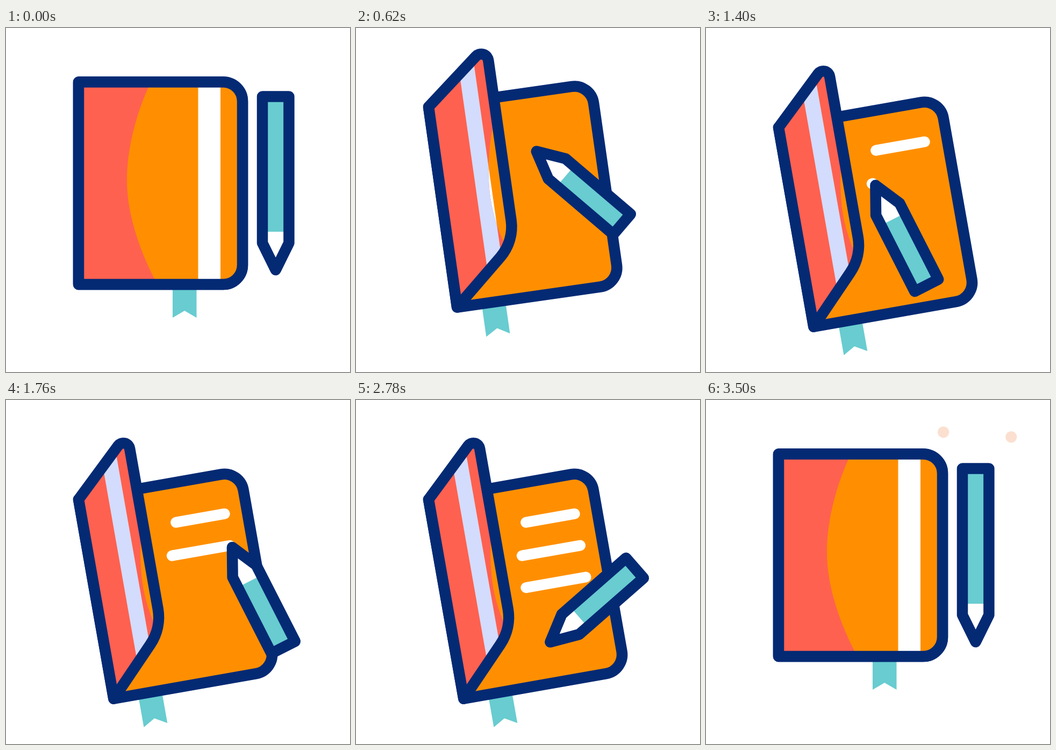
Write an HTML page with a canvas that moves like this. It is 640x640 px and loops after 3.6 s.

```html
<!DOCTYPE html>
<html lang="en">
<head>
<meta charset="utf-8">
<title>Notebook and pencil</title>
<style>
  html, body { margin: 0; width: 100%; height: 100%; overflow: hidden; background: #fff; }
  canvas { display: block; width: 640px; height: 640px; }
</style>
</head>
<body>
<canvas id="stage" width="640" height="640"></canvas>
<script>
const ctx = document.getElementById('stage').getContext('2d');
const LOOP = 3600;
const NAVY = '#042a74', ORANGE = '#ff8f00', CORAL = '#ff6150';
const TEAL = '#68ccd0', LAVENDER = '#d3dcfc', DOT = '242,152,98';
const W = 305, H = 376.5, R = 36, STROKE = 20.5;
const SPINE = { x: 135, y: 100.5 }, TILT = 10, DROP = 84.5;

const rad = deg => deg * Math.PI / 180;
const mix = (a, b, k) => a + (b - a) * k;
const blend = (p, q, k) => ({ x: mix(p.x, q.x, k), y: mix(p.y, q.y, k) });
const ramp = (t, from, to) => Math.min(1, Math.max(0, (t - from) / (to - from)));
const move = (t, from, to) => (1 - Math.cos(Math.PI * ramp(t, from, to))) / 2;
// Rises to 1 during a..b, falls back to 0 during c..d
const swell = (t, a, b, c, d) => move(t, a, b) - move(t, c, d);

// Handwritten rows in page coordinates
const rows = [171, 153, 150].map((x, i) => ({
  from: { x, y: 73.5 + 59.8 * i },
  to: { x: 263, y: 73.5 + 59.8 * i },
  start: 725 + 640 * i,
  end: 1145 + 640 * i
}));

function poly(points) {
  ctx.beginPath();
  points.forEach(([x, y]) => ctx.lineTo(x, y));
  ctx.closePath();
}

function fill(color) {
  ctx.fillStyle = color;
  ctx.fill();
}

function outline() {
  ctx.strokeStyle = NAVY;
  ctx.lineWidth = STROKE;
  ctx.stroke();
}

// Board hinged at x = 0; opening narrows it and lifts its free side
function board(open) {
  const edge = W * (1 - 0.639 * open);
  const top = -105 * open, bottom = H - 114 * open;
  ctx.beginPath();
  ctx.moveTo(0, 0);
  ctx.arcTo(edge, top, edge, bottom, mix(R, 12, open));
  ctx.arcTo(edge, bottom, 0, H, mix(R, 90, open));
  ctx.lineTo(0, H);
  ctx.closePath();
  return edge;
}

function shade() {
  ctx.beginPath();
  ctx.moveTo(-40, -200);
  ctx.lineTo(224, -200);
  ctx.lineTo(130, 9.5);
  ctx.bezierCurveTo(104, 68, 90, 130, 90, 183);
  ctx.bezierCurveTo(90, 240, 110, 305, 141, 366);
  ctx.lineTo(200, 480);
  ctx.lineTo(-40, 480);
  ctx.closePath();
}

function drawCover(open) {
  ctx.save();
  const edge = board(open), scale = edge / W;
  const left = edge - 39.4 - 43.1 * scale;
  const right = edge - 18.5 - 22.5 * scale;
  const paint = (color, from, to) => {
    ctx.fillStyle = color;
    ctx.fillRect(from, -200, to - from, 700);
  };
  ctx.clip();
  paint(ORANGE, -20, 380);
  paint('#fff', left, right);
  shade();
  ctx.clip();
  paint(CORAL, -20, 380);
  paint(LAVENDER, left, right);
  ctx.restore();

  board(open);
  outline();
}

function drawRows(t) {
  ctx.strokeStyle = '#fff';
  ctx.lineWidth = 20;
  for (const { from, to, start, end } of rows) {
    if (t <= start) continue;
    const tip = blend(from, to, move(t, start, end));
    ctx.beginPath();
    ctx.moveTo(from.x, from.y);
    ctx.lineTo(tip.x, tip.y);
    ctx.stroke();
  }
}

function drawRibbon(x) {
  poly([[x, H], [x + 44.5, H], [x + 44.5, 438.5], [x + 22.2, 425.5], [x, 438.5]]);
  fill(TEAL);
}

function drawBook(t) {
  ctx.save();
  ctx.translate(SPINE.x, SPINE.y + DROP * swell(t, 405, 812, 2790, 3210));
  ctx.rotate(-rad(TILT) * swell(t, 200, 790, 2790, 3420));
  drawRibbon(175 - 129 * swell(t, 200, 430, 3265, 3500));
  board(0);
  fill(ORANGE);
  drawRows(t);
  board(0);
  outline();
  drawCover(swell(t, 200, 702, 2880, 3430));
  ctx.restore();
}

// Stage position of the writing tip on the settled page
function writingTip(t) {
  let p = rows[0].from, last = 0;
  for (const { from, to, start, end } of rows) {
    p = blend(p, from, move(t, last, start));
    p = blend(p, to, move(t, start, end));
    last = end;
  }
  const x = p.x + 4, y = p.y + 4, a = rad(TILT);
  return {
    x: SPINE.x + x * Math.cos(a) + y * Math.sin(a),
    y: SPINE.y + DROP - x * Math.sin(a) + y * Math.cos(a)
  };
}

function pencilPose(t) {
  const rest = { x: 501.7, y: 288.75 }, sweep = { x: 440, y: 381.5 };
  const reach = move(t, 200, 762);
  const away = move(t, 2440, 2780), home = move(t, 2780, 3400);
  const half = mix(161.25, 104.5, swell(t, 200, 600, 2780, 3400));

  let angle = 153 * reach;
  const tip = writingTip(t);
  const aim = { x: tip.x + half * Math.sin(rad(angle)), y: tip.y - half * Math.cos(rad(angle)) };
  angle = mix(mix(angle, 48.8, away), 0, home);

  // Returns above its place, then drops into it
  const hover = { x: rest.x, y: rest.y - 84 * (1 - ramp(t, 3400, 3500) ** 2) };
  const center = blend(blend(blend(rest, aim, reach), sweep, away), hover, home);
  return { ...center, angle, half };
}

function drawPencil(t) {
  const { x, y, angle, half } = pencilPose(t);
  const side = 24.7, shoulder = half - 50;
  ctx.save();
  ctx.translate(x, y);
  ctx.rotate(rad(angle));
  const body = () => poly([[-side, -half], [side, -half], [side, shoulder], [0, half], [-side, shoulder]]);
  body();
  fill('#fff');
  ctx.fillStyle = TEAL;
  ctx.fillRect(-side, -half, side * 2, half * 2 - 71);
  body();
  outline();
  ctx.restore();
}

function drawDots(t) {
  const alpha = move(t, 3260, 3340) - 0.7 * ramp(t, 3400, 3500);
  for (const [x, y] of [[441.7, 59.8], [567.8, 68.8]]) {
    ctx.beginPath();
    ctx.arc(x, y, 10.6, 0, Math.PI * 2);
    fill(`rgba(${DOT},${alpha})`);
  }
}

function draw(t) {
  ctx.fillStyle = '#fff';
  ctx.fillRect(0, 0, 640, 640);
  ctx.lineJoin = ctx.lineCap = 'round';
  drawBook(t);
  drawDots(t);
  drawPencil(t);
}

const start = performance.now();
function tick() {
  draw((performance.now() - start) % LOOP);
  requestAnimationFrame(tick);
}
tick();
</script>
</body>
</html>
```
